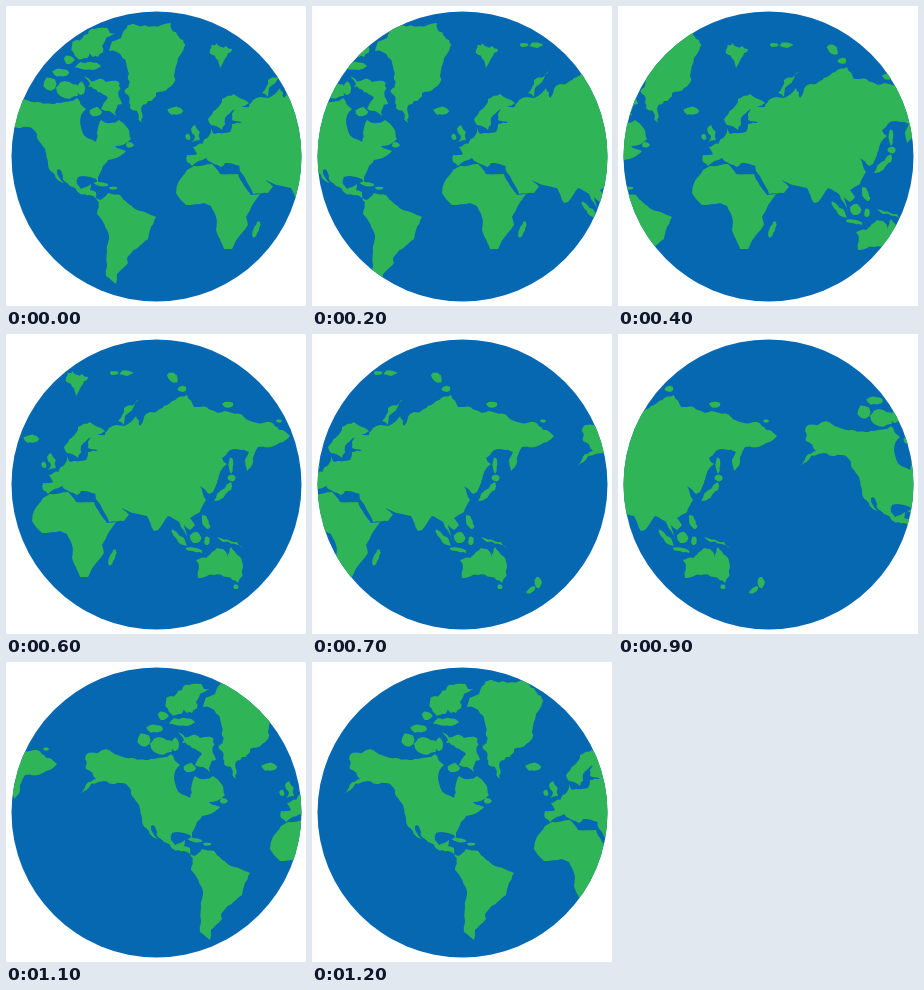
Write an HTML page that moves like this. It is 300 px wide and 300 px high and loops after 1300 ms.

```html
<!DOCTYPE html>
<html lang="en">
<head>
<meta charset="utf-8">
<title>Turning globe</title>
<style>
  html, body { margin: 0; width: 100%; height: 100%; overflow: hidden; background: #fff; }
  svg { display: block; width: 100vw; height: 100vh; }
</style>
</head>
<body>
<svg viewBox="0 0 300 300">
  <clipPath id="disc"><circle cx="150.5" cy="150.5" r="145"/></clipPath>
  <circle cx="150.5" cy="150.5" r="145" fill="#0768b2"/>
  <g clip-path="url(#disc)" fill="#2fb457">
    <g id="world">
      <path id="land"/>
      <use href="#land" x="471"/>
    </g>
  </g>
</svg>
<script>
let seed = 7, path = "", originX = 0;
const random = () => (seed = seed * 16807 % 2147483647) / 2147483647;

// Breaks a straight coast into small bays and capes.
function coast([ax, ay], [bx, by], rough) {
  const dx = bx - ax, dy = by - ay;
  if (Math.hypot(dx, dy) < 5) return [[ax, ay]];
  const bend = (random() - 0.5) * rough;
  const mid = [ax + dx / 2 - dy * bend, ay + dy / 2 + dx * bend];
  return [...coast([ax, ay], mid, rough), ...coast(mid, [bx, by], rough)];
}

function outline(points, rough) {
  const edge = points.flatMap((p, i) => coast(p, points[(i + 1) % points.length], rough));
  path += "M" + edge.map(([x, y]) => `${(x + originX).toFixed(1)} ${y.toFixed(1)}`).join("L") + "Z";
}

function land(text, rough = 0.3) {
  outline(text.split(", ").map(p => p.split(" ").map(Number)), rough);
}

function isle(x, y, w, h, tilt = 0) {
  const c = Math.cos(tilt), s = Math.sin(tilt);
  const points = Array.from({ length: 9 }, (_, i) => {
    const a = i * Math.PI * 2 / 9, r = 0.43 + random() * 0.17;
    const u = Math.cos(a) * w * r, v = Math.sin(a) * h * r;
    return [x + u * c - v * s, y + u * s + v * c];
  });
  outline(points, 0.3);
}

// The Americas
originX = -94;
land("79 97, 82 91, 100 87, 126 96, 148 97, 165 92, 174 103, 168 116, 170 125, 184 136, 189 114, 199 117, 207 114, 219 133, 203 140, 214 145, 196 154, 190 163, 186 171, 188 180, 184 173, 172 170, 166 171, 165 178, 169 183, 179 178, 178 184, 184 186, 184 192, 190 194, 188 197, 178 189, 158 180, 147 163, 145 164, 152 177, 136 158, 130 139, 116 121, 100 119, 74 132, 90 117, 80 107");
land("187 195, 196 187, 208 189, 223 203, 244 211, 238 224, 236 233, 230 238, 215 252, 216 257, 205 268, 204 278, 194 270, 197 230, 185 208", 0.15);
land("162 47, 176 28, 186 22, 203 27, 190 40, 186 51, 170 53", 0.6);
land("172 70, 194 76, 210 98, 204 110, 189 103, 196 92, 186 86, 176 81", 0.6);
isle(155, 84, 24, 15);
isle(138, 78, 12, 13);
isle(149, 67, 16, 8);
isle(157, 54, 10, 9);
isle(175, 60, 24, 8);
isle(169, 82, 8, 13);
isle(184, 106, 12, 9);
isle(189, 178, 14, 4, 0.2);
isle(201, 182, 8, 3);
isle(218, 139, 7, 6);

// Greenland
originX = 0;
land("103 45, 115 32, 130 19, 165 17, 177 34, 172 52, 168 70, 150 87, 142 95, 136 117, 126 104, 122 65", 0.5);
isle(169, 105, 14, 8);

// Africa
originX = 144;
land("37 164, 44 160, 62 158, 70 168, 88 168, 101 189, 110 188, 96 211, 98 219, 91 228, 82 243, 74 243, 66 224, 67 215, 61 200, 54 197, 36 199, 26 187, 28 177", 0.12);
isle(106, 224, 6, 18, 0.35);

// Europe
land("37 156, 37 149, 47 148, 43 141, 59 130, 61 122, 64 128, 80 126, 82 118, 92 117, 82 114, 85 103, 75 112, 72 124, 61 119, 58 113, 72 93, 84 88, 99 97, 91 101, 103 102, 112 155, 90 160, 75 157, 71 161, 62 150, 68 159, 56 152, 42 160");
land("45 119, 50 134, 42 136, 45 130, 41 123");
isle(38, 131, 5, 6);

// Asia, north and south halves overlapping
land("98 104, 103 94, 118 92, 130 82, 134 92, 140 80, 158 72, 181 61, 188 73, 212 79, 238 83, 264 88, 284 102, 252 113, 247 128, 241 137, 239 126, 243 118, 222 118, 216 124, 221 130, 212 146, 200 152, 100 154");
land("95 140, 212 140, 207 158, 203 160, 194 152, 200 166, 194 178, 184 184, 189 191, 184 196, 178 191, 182 206, 173 188, 162 182, 152 196, 148 197, 141 182, 112 171, 123 181, 118 187, 103 188, 90 165", 0.15);

// Polar islands
land("60 44, 76 40, 82 43, 70 62", 0.6);
land("133 65, 118 74, 112 87, 118 91, 119 82");
isle(108, 39, 9, 4);
isle(120, 39, 13, 5);
isle(167, 44, 12, 8, 0.7);
isle(176, 55, 9, 6);
isle(222, 71, 11, 6);
isle(273, 87, 6, 3);

// East Asian islands
land("225 148, 225 156, 208 167, 211 160");
isle(226, 144, 8, 6);
isle(225, 131, 4, 16);
isle(200, 188, 6, 16, -0.35);
isle(190, 204, 11, 12);
isle(173, 204, 22, 6, 0.8);
isle(189, 216, 17, 4, 0.2);
isle(201, 207, 6, 8);

// Oceania
land("211 203, 231 208, 237 214, 217 208");
land("190 226, 208 217, 211 214, 217 215, 222 223, 225 213, 237 233, 232 249, 221 243, 208 241, 192 244");
isle(230, 253, 5, 5);
isle(268, 248, 7, 11);
isle(261, 256, 10, 5, -0.6);

document.getElementById("land").setAttribute("d", path);

// Distance turned at each step; the globe speeds up over the Pacific.
const STEP = 100;
const turned = [0, 20, 40, 68, 96, 120, 144, 186, 228, 269, 323, 377, 419];
const world = document.getElementById("world");
const start = performance.now();

function draw() {
  const step = Math.floor((performance.now() - start) / STEP) % turned.length;
  world.setAttribute("transform", `translate(${-turned[step]})`);
  requestAnimationFrame(draw);
}
draw();
</script>
</body>
</html>
```
